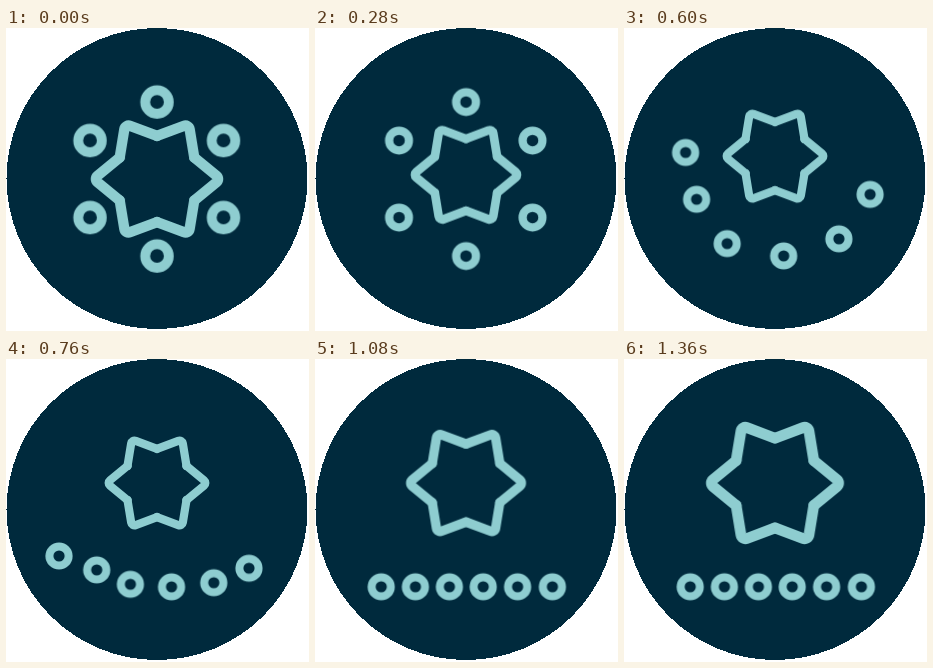
Recreate the animation shown at these times as an HTML page. Size 303 by 303 pixels, loop 1400 ms.

```html
<!DOCTYPE html>
<html lang="en">
<head>
<meta charset="utf-8">
<title>Star and rings</title>
<style>
  html, body { margin: 0; width: 100%; height: 100%; overflow: hidden; background: #fff; }
  svg { display: block; width: 100vw; height: 100vh; }

  .disc { fill: #002a3d; shape-rendering: crispEdges; }
  .lines { fill: none; stroke: #8ecdd0; stroke-linecap: round; stroke-linejoin: round; }

  .star, .size, .ring, .ring circle {
    animation: 1400ms linear infinite;
    transform-origin: 0 0;
  }
  .star { stroke-width: 8.2; animation-name: rise; }
  .size { animation-name: pulse; }
  .ring { stroke-width: 8; offset-rotate: 0deg; animation-name: travel; }
  .ring circle { animation-name: settle; }

  /* The shrinking moves begin part-way through their ease. */
  @keyframes rise {
    0%, 8.571% {
      transform: translate(151px, 151px);
      animation-timing-function: cubic-bezier(.333, 0, .667, 1);
    }
    54.286%, 100% { transform: translate(151px, 124px); }
  }
  @keyframes pulse {
    0% {
      transform: scale(1.264);
      animation-timing-function: cubic-bezier(.333, .348, .667, 1);
    }
    31.429% { transform: scale(1); }
    57.143% {
      transform: scale(1);
      animation-timing-function: cubic-bezier(.333, 0, .667, 1);
    }
    100% { transform: scale(1.32); }
  }
  @keyframes travel {
    0%, 20% {
      offset-distance: 0%;
      animation-timing-function: cubic-bezier(.333, 0, .667, 1);
    }
    65.714%, 100% { offset-distance: 100%; }
  }
  @keyframes settle {
    0% {
      transform: scale(1.23);
      animation-timing-function: cubic-bezier(.333, .429, .667, 1);
    }
    28.571%, 100% { transform: scale(1); }
  }

  .a { offset-path: path("M151 74C74 66 22 157.5 66.2 227.8"); }
  .b { offset-path: path("M84 112.5C49 144 82 195.5 100.4 227.8"); }
  .c { offset-path: path("M84 189.5C82 209.5 119 225.5 134.4 227.8"); }
  .d { offset-path: path("M151 228L168.2 227.8"); }
  .e { offset-path: path("M217.5 189.5C219 201 214 222 202.6 227.8"); }
  .f { offset-path: path("M217.5 112.5C252 136 252 188.5 237.4 227.8"); }
</style>
</head>
<body>
<svg viewBox="0 0 303 303">
  <defs>
    <path id="tip" d="M29.5 -17.05L47.1 -2.63A3.4 3.4 0 0 1 47.1 2.63L29.5 17.05"/>
  </defs>
  <circle class="disc" cx="151" cy="150.5" r="150.5"/>
  <g class="lines">
    <g class="star">
      <g class="size">
        <use href="#tip"/>
        <use href="#tip" transform="rotate(60)"/>
        <use href="#tip" transform="rotate(120)"/>
        <use href="#tip" transform="rotate(180)"/>
        <use href="#tip" transform="rotate(240)"/>
        <use href="#tip" transform="rotate(300)"/>
      </g>
    </g>
    <g class="ring a"><circle r="9.6"/></g>
    <g class="ring b"><circle r="9.6"/></g>
    <g class="ring c"><circle r="9.6"/></g>
    <g class="ring d"><circle r="9.6"/></g>
    <g class="ring e"><circle r="9.6"/></g>
    <g class="ring f"><circle r="9.6"/></g>
  </g>
</svg>
</body>
</html>
```
